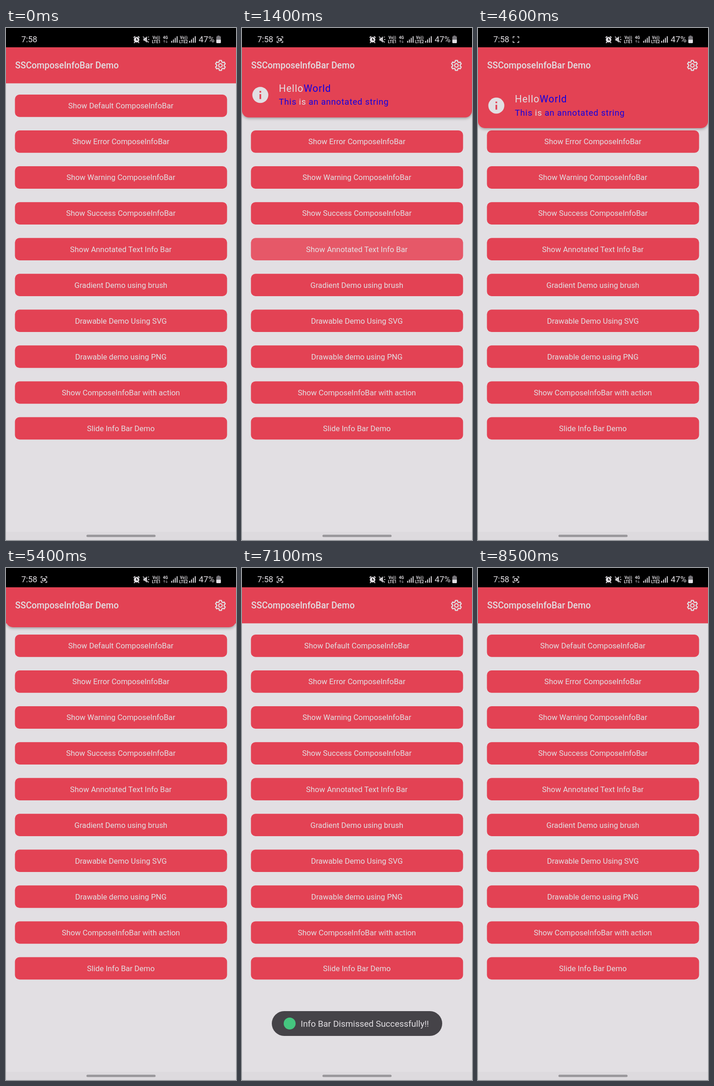
An HTML page for the animation above (8600 ms loop, 502 by 1115 pixels).

```html
<!DOCTYPE html>
<html lang="en">
<head>
<meta charset="utf-8">
<title>SSComposeInfoBar Demo</title>
<style>
  :root { --red: #e34254; --light: #e2dfe3; --loop: 8600ms linear infinite; }
  html, body { margin: 0; width: 502px; height: 1115px; overflow: hidden; background: var(--light); }
  svg { display: block; }
  text { font-family: Roboto, "Noto Sans", sans-serif; fill: var(--light); white-space: pre; }
  .red { fill: var(--red); }
  .light { fill: var(--light); }
  .line { fill: none; stroke: var(--light); }
  .mid { text-anchor: middle; }
  .tiny text { font-size: 8.6px; font-weight: 600; }
  .blue { fill: #1200e0; }

  #info { animation: slide var(--loop); filter: drop-shadow(0 2px 3px rgba(0, 0, 0, .32)); }
  #toast { animation: toast var(--loop); }
  #ripple { transform-origin: 251px 482px; animation: ripple var(--loop); }
  #rec { animation: rec var(--loop); animation-timing-function: step-end; }
  #cam { animation: blink var(--loop); animation-timing-function: step-end; }

  /* critically damped spring, in 400 ms */
  @keyframes slide {
    0%, 14.65% { transform: translateY(-98px); visibility: hidden; }
    14.651% {
      transform: translateY(-98px); visibility: visible;
      animation-timing-function: linear(0, .09 6.25%, .264 12.5%, .594 25%, .801 37.5%, .908 50%, .96 62.5%, .983 75%, .993 87.5%, 1);
    }
    19.302% { transform: none; visibility: visible; }
    60.465% {
      transform: none; visibility: visible;
      animation-timing-function: linear(0, .09 6.25%, .264 12.5%, .594 25%, .801 37.5%, .908 50%, .96 62.5%, .983 75%, .993 87.5%, 1);
    }
    65.116%, 100% { transform: translateY(-98px); visibility: hidden; }
  }
  @keyframes toast {
    0% { opacity: 0; }
    66.86% { opacity: 0; animation-timing-function: ease-out; }
    71.512%, 93.023% { opacity: 1; }
    97.674%, 100% { opacity: 0; }
  }
  @keyframes ripple {
    0%, 11.6% { transform: scale(.3); opacity: 0; }
    12.5% { opacity: .12; }
    14.244% { transform: none; }
    16.279% { opacity: .12; }
    18.605%, 100% { transform: none; opacity: 0; }
  }
  @keyframes rec {
    0% { opacity: 0; }
    1.1%, 100% { opacity: 1; }
  }
  @keyframes blink {
    0%, 11.6%, 23.2%, 34.8%, 47.6%, 59.2%, 70.9%, 82.5%, 94.1% { opacity: 1; }
    5.8%, 17.4%, 29%, 41.8%, 53.4%, 65.1%, 76.7%, 88.3% { opacity: 0; }
    100% { opacity: 1; }
  }
</style>
</head>
<body>
<svg width="502" height="1115" viewBox="0 0 502 1115">
  <defs>
    <clipPath id="pressed"><rect x="19.5" y="457" width="463" height="49" rx="10"/></clipPath>
    <g id="bars" class="light">
      <rect y="28" width="2" height="4"/>
      <rect x="4" y="25" width="2" height="7"/>
      <rect x="8" y="21.5" width="2" height="10.5"/>
      <rect x="12" y="18" width="2" height="14"/>
    </g>
  </defs>

  <rect class="light" width="502" height="1115"/>
  <rect y="1097" width="502" height="18" fill="#dddade"/>
  <g id="buttons"></g>
  <g clip-path="url(#pressed)"><circle id="ripple" cx="251" cy="482" r="240" fill="#fff"/></g>

  <g id="info">
    <path class="red" d="M0 110H502V203a15 15 0 0 1-15 15H15a15 15 0 0 1-15-15z"/>
    <circle class="light" cx="40" cy="169" r="17.5"/>
    <path class="red" d="M38.2 160.2h3.6v3.6h-3.6zM38.2 167.2h3.6v10.6h-3.6z"/>
    <text x="80.5" y="162" font-size="21.3" letter-spacing="1">Hello<tspan class="blue">World</tspan></text>
    <text x="80.5" y="190.5" font-size="18.5" letter-spacing=".8"><tspan class="blue">This</tspan> is <tspan class="blue">an annotated string</tspan></text>
  </g>

  <!-- app bar -->
  <rect class="red" y="42" width="502" height="78.5"/>
  <text x="20" y="88" font-size="19.4" font-weight="500">SSComposeInfoBar Demo</text>
  <g class="line" transform="translate(468 81.5)" stroke-width="2.4" stroke-linejoin="round">
    <path id="gear"/>
    <circle r="3.9"/>
  </g>

  <!-- status bar -->
  <rect width="502" height="42"/>
  <text x="33.5" y="31" font-size="18">7:58</text>
  <g id="rec" class="line" stroke-width="1.4">
    <path d="M76.5 22.5V19h3.5M85.500 19H89v3.500M89 28v3.500h-3.500M80 31.500h-3.500V28"/>
    <path id="cam" d="M79.500 23h4.500v5h-4.500zM84 25l2.500-1.500v4L84 26"/>
  </g>
  <g transform="translate(285 25)">
    <circle class="light" cy=".6" r="6"/>
    <path class="line" stroke-width="2" stroke-linecap="round" d="M-6-4.500L-3.500-6.500M6-4.500L3.500-6.500M-4 6L-5 7M4 6L5 7"/>
    <path d="M0-3V1H3" fill="none" stroke="#000" stroke-width="1.5"/>
  </g>
  <g transform="translate(306 25)">
    <path class="light" d="M-6-2.500h3L1.500-7V7L-3 2.500h-3z"/>
    <path class="line" stroke-width="1.3" d="M3.500-4.500L6-6M4 0h3M3.500 4.500L6 6"/>
    <path d="M-6.500-5L5.500 7" stroke="#000" stroke-width="1.2"/>
    <path class="line" stroke-width="1.3" d="M-7-6.500L5 6.500"/>
  </g>
  <g class="tiny mid">
    <text x="328" y="24">Vo))</text>
    <text x="328" y="32.500">LTE1</text>
    <text x="348" y="24">4G</text>
    <text x="388" y="24">Vo))</text>
    <text x="387.500" y="32.500">LTE2</text>
  </g>
  <path fill="none" stroke="#77757a" stroke-width="1.2" d="M345.500 32.500v-5.500M343.500 29l2-2 2 2M350.500 26.500v5.500M348.500 30l2 2 2-2"/>
  <use href="#bars" x="360.500"/>
  <use href="#bars" x="400"/>
  <text x="420.500" y="31" font-size="18.600">47%</text>
  <rect x="461.500" y="16.500" width="4.500" height="3" fill="#77757a"/>
  <rect x="459" y="18" width="10" height="15" rx="1.800" fill="#77757a"/>
  <path class="light" d="M459 25.500h10v5.700a1.800 1.800 0 0 1-1.800 1.800h-6.400a1.800 1.800 0 0 1-1.800-1.800z"/>

  <g id="toast">
    <rect x="65" y="965" width="372" height="54" rx="27" fill="#454348"/>
    <circle cx="104" cy="992" r="13" fill="#45c57f"/>
    <text x="128" y="999" font-size="18.960">Info Bar Dismissed Successfully!!</text>
  </g>
  <rect x="175.500" y="1103.500" width="151" height="5" rx="2.500" fill="#98969a"/>
</svg>
<script>
  const labels = [
    "Show Default ComposeInfoBar", "Show Error ComposeInfoBar", "Show Warning ComposeInfoBar",
    "Show Success ComposeInfoBar", "Show Annotated Text Info Bar", "Gradient Demo using brush",
    "Drawable Demo Using SVG", "Drawable demo using PNG", "Show ComposeInfoBar with action",
    "Slide Info Bar Demo"
  ];
  document.getElementById("buttons").innerHTML = labels.map((label, i) => {
    const y = 145 + 78.05 * i;
    return `<rect class="red" x="19.5" y="${y}" width="463" height="48.8" rx="10"/>
      <text class="mid" x="250.7" y="${y + 30.3}" font-size="16.8">${label}</text>`;
  }).join("");

  // six teeth, four corners each
  const corners = [[-22, 8.1], [-12, 11.1], [12, 11.1], [22, 8.1]];
  const points = [];
  for (let tooth = 0; tooth < 6; tooth++) {
    for (const [turn, r] of corners) {
      const a = (tooth * 60 + 30 + turn) * Math.PI / 180;
      points.push(`${(r * Math.cos(a)).toFixed(2)} ${(r * Math.sin(a)).toFixed(2)}`);
    }
  }
  document.getElementById("gear").setAttribute("d", `M${points.join("L")}z`);
</script>
</body>
</html>
```
